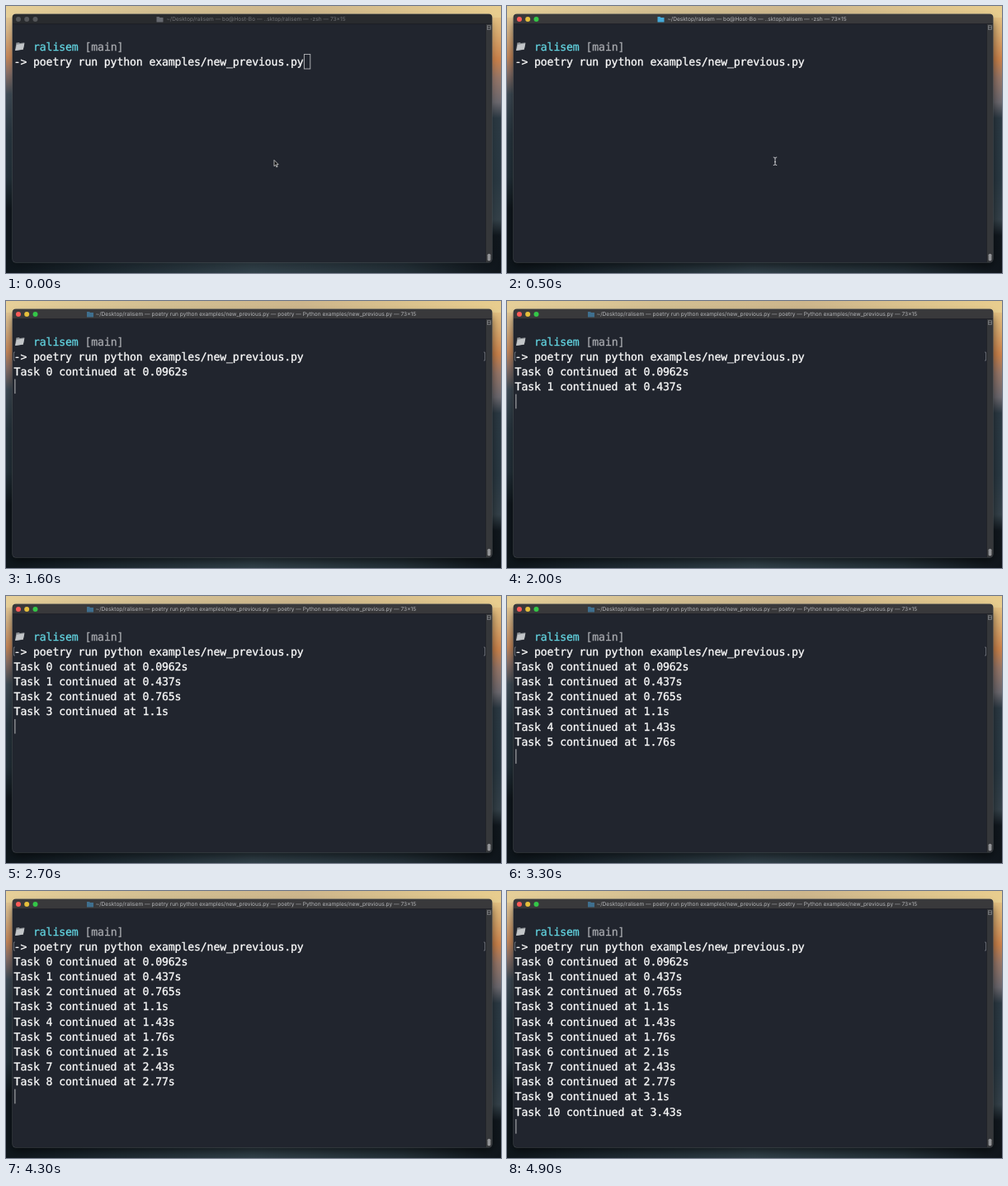
Write an HTML page that moves like this. It is 600 px wide and 323 px high and loops after 5000 ms.

```html
<!DOCTYPE html>
<html lang="en">
<head>
<meta charset="utf-8">
<title>Terminal session</title>
<style>
  html, body { margin: 0; width: 100%; height: 100%; overflow: hidden; background: #10161d; }
  svg { display: block; width: 100vw; height: 100vh; }
  text { text-rendering: geometricPrecision; white-space: pre; }
  #screen { font: 13.2px "DejaVu Sans Mono", "Liberation Mono", monospace; letter-spacing: -0.14px; }
  #screen text { stroke-width: .3; }
  #title { font: 6.6px Inter, "Open Sans", sans-serif; text-anchor: middle; }
</style>
</head>
<body>
<svg viewBox="0 0 600 323" preserveAspectRatio="none">
  <defs>
    <linearGradient id="left" x2="0" y2="1">
      <stop offset="0" stop-color="#e6cf98"/>
      <stop offset=".09" stop-color="#dbb98a"/>
      <stop offset=".19" stop-color="#c98a5c"/>
      <stop offset=".25" stop-color="#8d736a"/>
      <stop offset=".33" stop-color="#414e59"/>
      <stop offset=".48" stop-color="#2a3842"/>
      <stop offset=".64" stop-color="#24323b"/>
      <stop offset=".76" stop-color="#10171d"/>
      <stop offset="1" stop-color="#0f171d"/>
    </linearGradient>
    <linearGradient id="right" x2="0" y2="1">
      <stop offset="0" stop-color="#e8cd8e"/>
      <stop offset=".1" stop-color="#dcae72"/>
      <stop offset=".2" stop-color="#cc834c"/>
      <stop offset=".27" stop-color="#98786a"/>
      <stop offset=".36" stop-color="#6d6a70"/>
      <stop offset=".42" stop-color="#2c3a44"/>
      <stop offset=".65" stop-color="#2a3943"/>
      <stop offset=".8" stop-color="#35424a"/>
      <stop offset=".86" stop-color="#11181e"/>
      <stop offset="1" stop-color="#10161c"/>
    </linearGradient>
    <linearGradient id="sky">
      <stop offset="0" stop-color="#e6cf98"/>
      <stop offset=".3" stop-color="#d3bf92"/>
      <stop offset=".6" stop-color="#cdb68c"/>
      <stop offset="1" stop-color="#e8cd8e"/>
    </linearGradient>
    <linearGradient id="ground">
      <stop offset="0" stop-color="#0f171d"/>
      <stop offset=".2" stop-color="#1e2a32"/>
      <stop offset=".5" stop-color="#33434c"/>
      <stop offset=".8" stop-color="#26333b"/>
      <stop offset="1" stop-color="#10161c"/>
    </linearGradient>
    <filter id="blur" x="-20%" y="-20%" width="140%" height="140%">
      <feGaussianBlur stdDeviation="6"/>
    </filter>
  </defs>

  <rect width="300" height="323" fill="url(#left)"/>
  <rect x="300" width="300" height="323" fill="url(#right)"/>
  <rect width="600" height="14" fill="url(#sky)"/>
  <rect y="306" width="600" height="17" fill="url(#ground)"/>
  <rect id="shadow" x="8" y="18" width="581" height="297" rx="5" filter="url(#blur)"/>

  <rect x="7.5" y="9.5" width="582" height="301" rx="4.5" fill="#4b5055"/>
  <rect x="8" y="10" width="581" height="300" rx="4" fill="#21252e"/>
  <path id="bar" d="M8 21.5V14q0-4 4-4H585q4 0 4 4v7.5z"/>
  <path d="M8 21.75H589" stroke="#141518" stroke-width=".5"/>
  <path d="M581.5 22H589V306q0 4-4 4h-3.5z" fill="#35373a"/>
  <path d="M581.5 22V310" stroke="#1c1e23" stroke-width=".6"/>
  <rect x="583.4" y="23.8" width="4.2" height="4.6" fill="none" stroke="#8b8d91" stroke-width=".7"/>
  <path d="M583.4 26.1h4.2" stroke="#8b8d91" stroke-width=".7"/>
  <rect x="583.6" y="299.7" width="3.8" height="8.6" rx="1.6" fill="#929396"/>

  <g id="lights">
    <circle cx="15" cy="16" r="3"/>
    <circle cx="25.2" cy="16" r="3"/>
    <circle cx="35.5" cy="16" r="3"/>
  </g>
  <path id="folder" d="M0 13h3l1 1h4v5.6H0z"/>
  <text id="title" x="303" y="18.4"></text>

  <path d="M12.4 44.4l3.4-.5 1 1.2 5.6-.8-1.6 8.4-9.8 1.3z" fill="#8d9195"/>
  <path d="M13 46.8l9.4-1.6-1.6 7.4-9.6 1.3z" fill="#c2c5c8"/>
  <g id="screen"></g>

  <path id="marks" d="M11 62H9.5V72H11M579 62h1.5V72H579" fill="none" stroke="#777a82" stroke-width=".8"/>
  <rect id="box" x="361.4" y="58.4" width="7.4" height="17.6" fill="none" stroke="#b8b9bc" stroke-width=".9"/>
  <rect id="caret" width="1" height="17.6" fill="#b8b9bc"/>
  <path id="arrow" d="M325 186.4v7.4l1.7-1.6 1.2 2.7 1.2-.5-1.2-2.7h2.3z" fill="#111" stroke="#eee" stroke-width=".7"/>
  <path id="beam" d="M322.8 183q2.2 0 2.2 1.2q0-1.2 2.2-1.2M325 184v7.6M322.8 192.6q2.2 0 2.2-1.2q0 1.2 2.2 1.2M324 188.6h2" fill="none" stroke="#d5d6d8" stroke-width=".9"/>
</svg>
<script>
const LOOP = 5000, FOCUS = 300, ENTER = 900, START = 1350;
const X0 = 9.6, CELL = 7.81, BASE = 53.7, PITCH = 18.15;
const COMMAND = "poetry run python examples/new_previous.py";
const TASKS = [0.0962, 0.437, 0.765, 1.1, 1.43, 1.76, 2.1, 2.43, 2.77, 3.1, 3.43];
const LIGHTS = ["#fc5b57", "#e5bf3c", "#34c648"];

const $ = id => document.getElementById(id);
const show = (id, on) => $(id).setAttribute("visibility", on ? "visible" : "hidden");
const fill = (node, color) => node.setAttribute("fill", color);

function write(row, col, string, color = "#fbfbfb") {
  const node = document.createElementNS("http://www.w3.org/2000/svg", "text");
  node.setAttribute("x", X0 + col * CELL);
  node.setAttribute("y", BASE + row * PITCH);
  fill(node, color);
  node.setAttribute("stroke", color);
  node.textContent = string;
  $("screen").append(node);
  return node;
}

write(0, 3, "ralisem", "#62d3e0");
write(0, 11, "[main]", "#a6a8ad");
write(1, 0, "-> " + COMMAND);
const lines = TASKS.map((s, i) => write(i + 2, 0, `Task ${i} continued at ${s}s`));

function titleAt(t) {
  const path = "~/Desktop/ralisem", size = "73×15";
  const parts = t < ENTER ? [path, "bo@Host-Bo", "..sktop/ralisem", "-zsh", size]
    : [path, COMMAND, "poetry", t < START ? COMMAND : "Python examples/new_previous.py", size];
  return parts.join(" — ");
}

function draw(t) {
  const focused = t >= FOCUS, running = t >= ENTER;

  $("shadow").setAttribute("opacity", focused ? 0.6 : 0.3);
  fill($("bar"), focused ? "#39393b" : "#292b2e");
  [...$("lights").children].forEach((dot, i) => fill(dot, focused ? LIGHTS[i] : "#55575a"));

  const title = titleAt(t);
  if ($("title").textContent !== title) $("title").textContent = title;
  fill($("title"), focused ? "#b3b4b7" : "#707276");
  const iconX = !running ? 182.5 : t < START ? 81 : 98;
  $("folder").setAttribute("transform", `translate(${iconX} 0)`);
  fill($("folder"), !focused ? "#66696f" : running ? "#3f6f8e" : "#45a9d8");

  const done = TASKS.filter(s => t >= START + s * 1000).length;
  lines.forEach((line, i) => line.setAttribute("visibility", i < done ? "visible" : "hidden"));

  show("box", !focused);
  show("arrow", !focused);
  show("beam", focused && !running);
  show("marks", running);
  show("caret", t >= 700);
  $("caret").setAttribute("x", running ? 10.4 : 361);
  $("caret").setAttribute("y", 58.2 + PITCH * (running ? done + 1 : 0));
}

const began = performance.now();
function tick() {
  draw((performance.now() - began) % LOOP);
  requestAnimationFrame(tick);
}
tick();
</script>
</body>
</html>
```
